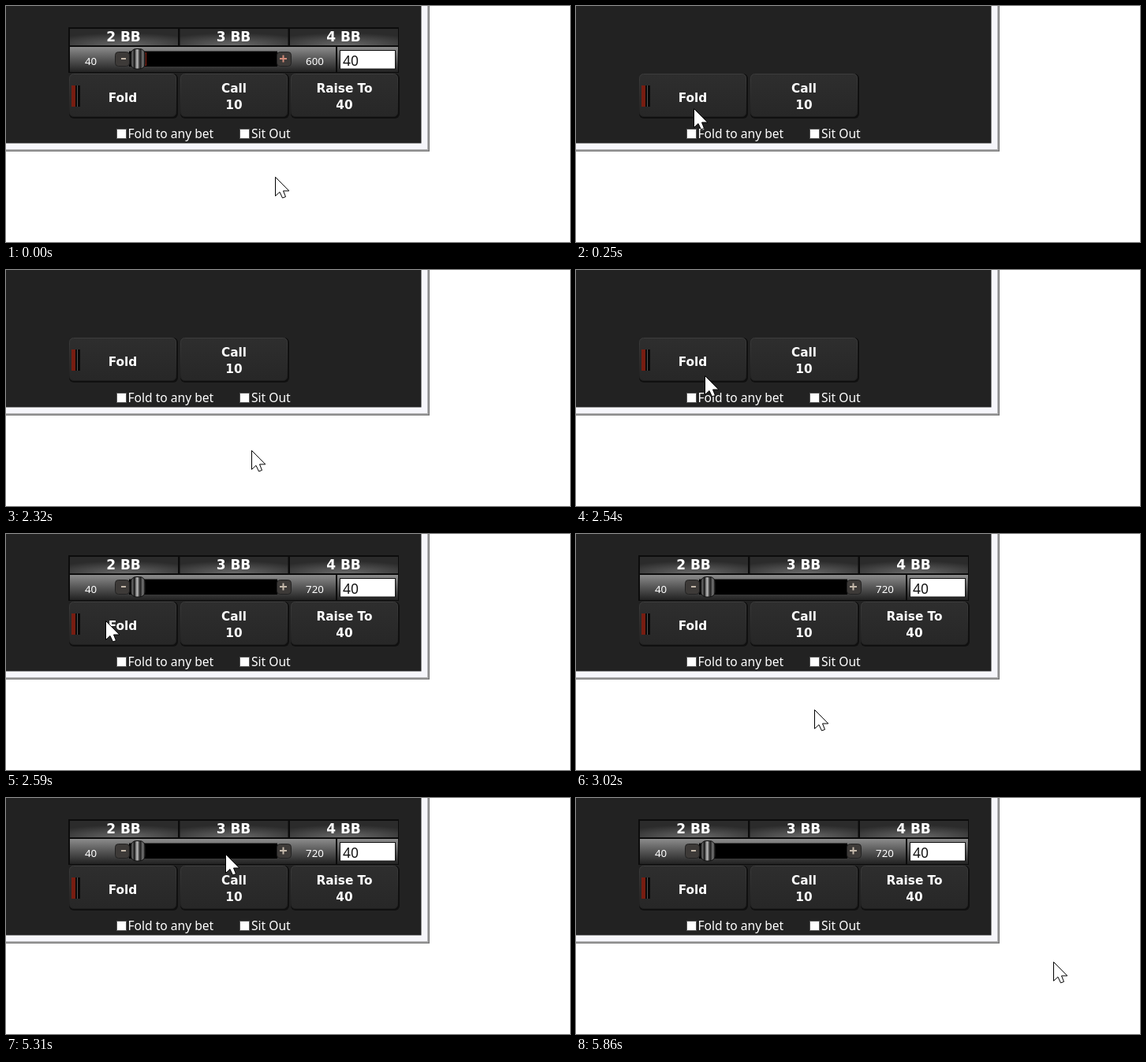
These frames come from a looping animation (715x300 px, 7.22 s). An HTML page:

```html
<!DOCTYPE html>
<html lang="en">
<head>
<meta charset="utf-8">
<title>Table controls</title>
<style>
html, body { margin: 0; width: 100%; height: 100%; overflow: hidden; background: #fff; }
svg { display: block; width: 715px; height: 300px; }
text { fill: #fff; font-family: "Noto Sans", "Open Sans", sans-serif; font-size: 15.6px; }
.bold { font: bold 15.3px "DejaVu Sans", Verdana, sans-serif; text-anchor: middle; }
.tab { font-size: 17px; }
.small { font-size: 13.3px; text-anchor: middle; }
</style>
</head>
<body>
<svg viewBox="0 0 715 300">
  <defs>
    <radialGradient id="tabFill" cx=".5" cy="1" r=".75">
      <stop offset="0" stop-color="#6a6a6a"/><stop offset="1" stop-color="#2b2b2b"/>
    </radialGradient>
    <linearGradient id="rowFill" x2="0" y2="1">
      <stop offset="0" stop-color="#8c8c8c"/><stop offset=".5" stop-color="#555"/><stop offset="1" stop-color="#222"/>
    </linearGradient>
    <linearGradient id="btnFill" x2="0" y2="1">
      <stop offset="0" stop-color="#2e2e2e"/><stop offset="1" stop-color="#272727"/>
    </linearGradient>
    <linearGradient id="btnEdge" x2="0" y2="1">
      <stop offset="0" stop-color="#3c3c3c"/><stop offset="1" stop-color="#202020"/>
    </linearGradient>
    <linearGradient id="knobFill">
      <stop offset="0" stop-color="#222"/><stop offset=".15" stop-color="#666"/>
      <stop offset=".25" stop-color="#111"/><stop offset=".45" stop-color="#c0c0c0"/>
      <stop offset=".65" stop-color="#1a1a1a"/><stop offset=".85" stop-color="#777"/>
      <stop offset="1" stop-color="#000"/>
    </linearGradient>
  </defs>

  <rect width="715" height="300" fill="#fff"/>
  <rect width="537" height="185" fill="#7c7c7c"/>
  <rect width="535.5" height="183.5" fill="#b4b4b6"/>
  <rect width="534" height="182" fill="#f6f6fb"/>
  <rect width="526.5" height="174.5" fill="#222"/>

  <g id="buttons"></g>
  <rect x="83" y="101" width="5" height="27" fill="#781d11"/>
  <rect x="88" y="101" width="6" height="27" fill="#080808"/>
  <path d="M90.5 101v27" stroke="#555"/>

  <g fill="#fff" stroke="#555">
    <rect x="140.5" y="156.5" width="12" height="12"/>
    <rect x="296.5" y="156.5" width="12" height="12"/>
  </g>
  <text x="154.5" y="168">Fold to any bet</text>
  <text x="311" y="168">Sit Out</text>

  <g id="raise">
    <rect x="79" y="27" width="419" height="58" fill="#0c0c0c"/>
    <g id="tabs"></g>
    <rect x="81" y="52" width="337" height="32" fill="url(#rowFill)"/>
    <rect x="420" y="52" width="77" height="32" fill="url(#rowFill)"/>
    <rect x="156" y="57.5" width="188" height="19.5" fill="#000"/>
    <g fill="#3d3a38" stroke="#222">
      <rect x="138.5" y="58.5" width="18" height="18" rx="4"/>
      <rect x="343.5" y="58.5" width="18" height="18" rx="4"/>
    </g>
    <path d="M146 67h6" stroke="#c4b8aa" stroke-width="2"/>
    <path id="plus" d="M347 67h9M351.5 62.5v9" stroke="#c4b8aa" stroke-width="2"/>
    <rect id="redEdge" x="173" y="59" width="5" height="17" fill="#8a2113"/>
    <rect x="158" y="54.5" width="18.5" height="25.5" rx="7" fill="url(#knobFill)" stroke="#111"/>
    <text class="small" x="107.5" y="74.5">40</text>
    <text class="small" id="limit" x="391.5" y="74.5"></text>
    <rect x="423.5" y="56.5" width="70" height="23.5" fill="#fff" stroke="#111"/>
    <text x="427" y="76" style="fill:#111;font-size:17.5px">40</text>
  </g>

  <path id="cursor" d="M.5 .5V24.5L6 19.5L9.5 27L13.5 25.5L10.5 18H17.8Z" fill="#fff" stroke="#000"/>
</svg>
<script>
const LOOP = 7220;
const HIDE = 250, SHOW = 2590;
const $ = id => document.getElementById(id);

const label = (x, y, str, cls = "") => `<text class="bold ${cls}" x="${x}" y="${y}">${str}</text>`;

function button(x, lines) {
  const top = lines.length > 1 ? 110 : 122;
  return `<rect x="${x}" y="86" width="138" height="57" rx="6" fill="#101010"/>
    <rect x="${x + .5}" y="86.5" width="135" height="54" rx="5" fill="url(#btnFill)" stroke="url(#btnEdge)"/>` +
    lines.map((s, i) => label(x + 68, top + i * 21, s)).join("");
}

$("buttons").innerHTML = button(80, ["Fold"]) + button(221, ["Call", "10"]);
$("raise").insertAdjacentHTML("beforeend", button(361, ["Raise To", "40"]));
$("tabs").innerHTML = [2, 3, 4].map((n, i) => {
  const x = 81 + i * 139.5;
  return `<rect x="${x}" y="29" width="137" height="21" fill="url(#tabFill)"/>` +
    label(x + 68, 45, n + " BB", "tab");
}).join("");

// Each move jumps in even steps; "first" is where its first step lands.
// The panel reacts one step after the cursor reaches the Fold button.
const start = [341, 217];
const moves = [
  { from: 50, until: 200, steps: 4, to: [149, 130] },
  { from: 590, until: 770, steps: 5, to: [371, 268] },
  { from: 2320, until: 2545, steps: 6, to: [126, 110], first: [311, 229] },
  { from: 2870, until: 3020, steps: 4, to: [302, 223] },
  { from: 4750, until: 4930, steps: 5, to: [171, 40], first: [300, 223] },
  { from: 5260, until: 5390, steps: 4, to: [384, 102] },
  { from: 5730, until: 5860, steps: 4, to: [605, 208] }
];

function cursorAt(t) {
  let pos = start;
  for (const m of moves) {
    if (t < m.from) break;
    if (t >= m.until) { pos = m.to; continue; }
    const gap = (m.until - m.from) / (m.steps - 1);
    const step = Math.floor((t - m.from) / gap);
    const a = m.first || pos;
    const p = m.first ? step / (m.steps - 1) : (step + 1) / m.steps;
    return a.map((v, i) => Math.round(v + (m.to[i] - v) * p));
  }
  return pos;
}

function draw(t) {
  const early = t < HIDE;
  $("raise").style.display = early || t >= SHOW ? "" : "none";
  $("limit").textContent = early ? "600" : "720";
  $("redEdge").style.display = early ? "" : "none";
  $("plus").setAttribute("stroke", early ? "#d08a78" : "#c4b8aa");
  $("cursor").setAttribute("transform", `translate(${cursorAt(t)})`);
}

const origin = performance.now();
function tick() {
  draw((performance.now() - origin) % LOOP);
  requestAnimationFrame(tick);
}
tick();
</script>
</body>
</html>
```
